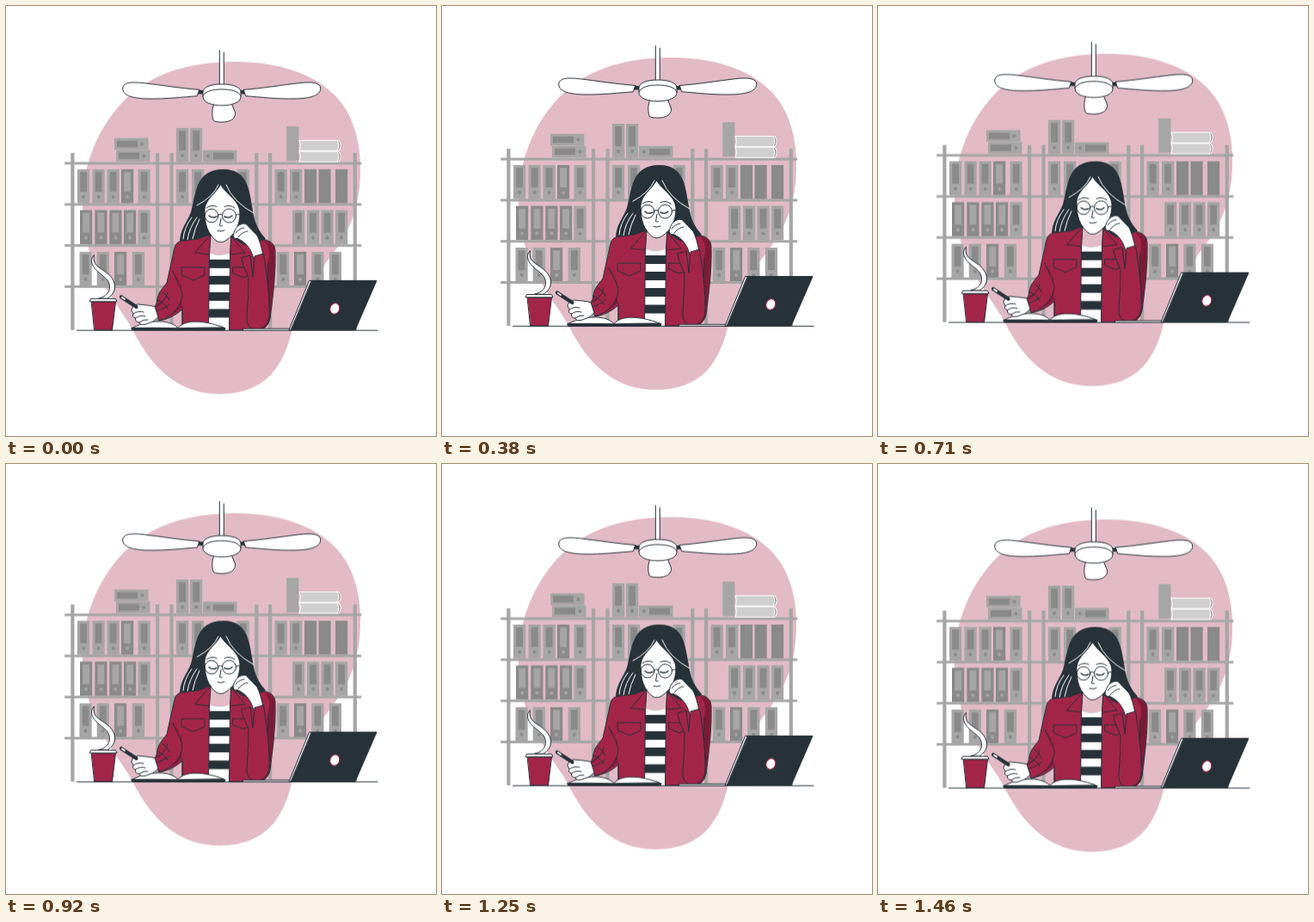
An HTML page for the animation above (1.5 s loop, 500 by 500 pixels).

```html
<!DOCTYPE html>
<html lang="en">
<head>
<meta charset="utf-8">
<title>Studying at the library</title>
<style>
  html, body { margin: 0; width: 100%; height: 100%; overflow: hidden; background: #fff; }
  svg { display: block; width: 100vw; height: 100vh; }
  #scene { animation: float 1.5s linear infinite; }
  @keyframes float { 50% { transform: translateY(-10px); } }
  .pink { fill: #e2bbc7; }
  .gray { fill: #a6a6a6; }
  .dim { fill: #8a8a8a; }
  .dark { fill: #263238; }
  .red { fill: #a32449; }
  .wine { fill: #7b1a37; }
  .white { fill: #fff; }
  .line { stroke: #263238; stroke-width: 1; stroke-linecap: round; stroke-linejoin: round; }
  .open { fill: none; }
  .strand { fill: none; stroke: #fff; stroke-width: 1; stroke-linecap: round; }
  .tome { fill: #cfcfcf; stroke: #fff; stroke-width: 1.1; }
</style>
</head>
<body>
<svg viewBox="0 0 500 500">
  <g id="scene">
    <path class="pink" d="M262 65C328 64 374 86 395 120C408 142 413 168 412 196C411 238 397 267 378 291C356 320 342 340 333 375C323 420 302 451 248 451.500C202 451 172 423 151 384C139 360 128 349 115 326C99 301 91 270 89 235C88 183 110 130 152 97C185 73 222 66 262 65Z"/>

    <g id="shelves"></g>
    <g class="tome">
      <path id="tome" d="M341 156.500H386.500Q389 158 389 162.300T386.500 168.500H341Q343.500 162.500 341 156.500Z"/>
      <use href="#tome" y="12.800"/>
      <path fill="none" d="M385.500 157Q388 162 385.500 168M385.500 170Q388 175 385.500 181"/>
      <path fill="none" stroke="#777" stroke-width=".8" d="M386.500 157.500Q389.800 162 386.500 167.500M386.500 170.500Q389.800 175 386.500 180.500"/>
    </g>

    <g id="fan" class="white line">
      <path d="M248.300 51.500V94H253.300V54"/>
      <path d="M222 98L231 99V102L222 102ZM280 98L271 99V102L280 102Z" class="dark"/>
      <path d="M224.500 97.500C204 96 180 92 160 89.700C145 88 136 89 135.700 96C136 105 149 107.500 164 108C187 108.500 205 106 222 104.800Z"/>
      <path d="M276.500 97.500C297 96 321 92 341 89.700C356 88 365.500 89 365.800 96C365.500 105 352 107.500 337 108C314 108.500 296 106 279 104.800Z"/>
      <path d="M242 114C239 121 239.500 127 241 133Q243 135.500 254 135C264 134 267 129 266.500 124L262 113Z"/>
      <path d="M229 100C229 94.500 238 91 251 91S273 94.500 273 100V106C273 112 263 115.800 251 115.800S229 112 229 106Z"/>
      <path class="open" d="M229 105C231 99 241 97 251 97S271 99 273 105"/>
    </g>

    <path class="dark" d="M202 275C202 260 211 251 215 240C221 218 220 190 253 190C282 190 283 216 287 238C289 253 294 262 302 271L292 281L208 279Z"/>
    <path class="strand" d="M206 271Q207 258 216 246M211 272Q213 258 222 246M217 271Q219 260 225 248"/>

    <path class="pink line" d="M238 262L236 290H261L262 262Z"/>
    <path class="white" d="M236 288Q248 291 260.500 288L260 377H235.500Z"/>
    <path class="dark" d="M236 295H260V305H236ZM236 314H260V324H236ZM236 333H260V343H236ZM236 352.500H260V362.500H236Z"/>

    <path class="white line" d="M249.500 208C243 219 233 224 231 236C230.500 254 235 266 245 273.500Q250 276.500 256 272.500C266 266 272 256 272 240C271 226 257 220 249.500 208Z"/>
    <path class="strand" d="M247 208Q241 222 222 232M256 208Q264 228 288 241"/>
    <g class="line open">
      <circle cx="239" cy="244" r="7.800"/>
      <circle cx="259.500" cy="244" r="8"/>
      <path d="M246.800 243Q249 241 251.500 243M267.500 243L272 242M233 235Q239 230.500 245 233.500M254 233.500Q260 230.500 266 235"/>
      <path stroke-width="1.500" d="M236 244Q240 247.500 245 245M254 245Q259 247.500 263 244"/>
      <path d="M250 247L248.500 255.500Q250 257 251.500 255.500M246 261.500Q250 263 254 261"/>
    </g>

    <g class="line">
      <path class="red" d="M223 271L203 273.500Q196 275 194.500 288L187 322C181 330 176 334 175.500 345L173 350L178 366C186 365 196 361 205 353L205 377H235.500L236.500 289L238 266Z"/>
      <path class="red" d="M262 268L277 278L286 275L301 272Q312 274 313 284C314 312 310 340 307 364Q304 377 290 377H259.500L260.500 289Z"/>
    </g>
    <path class="wine" d="M300 273Q312 275 312.500 285C313 313 309 343 306.500 364Q304 375 298 376Q306 360 305 333Q303 309 306 290Q307 280 300 273ZM194 310Q201 316 203 325C198 335 185 341 176 347Q177 357 181 363Q196 360 204 350V325Z"/>
    <path class="red line" d="M194 309C199 321 205 329 205 337C203 350 194 361 178 366L172.500 351Q186 344 188 333"/>
    <g class="line open">
      <path d="M238 266L219.500 287L236.500 289M262 268L278 287L261 289M205 350V377"/>
      <path d="M204.500 304H231V313L218 319L204.500 313ZM264 304H281L283 313L276 316L264 311Z"/>
      <path d="M182 333Q188 337 190 342M176 342Q184 345 188 352M174 355Q183 353 190 347M305 298Q303 330 307 351"/>
    </g>

    <path class="white line" d="M264 268C265 258 272 252 279 253.500L292 267Q296 275 299 290L288 294C285 282 278 274 269 270.500Q266 272 264 268Z"/>
    <path class="line open" d="M267 264Q272 258 277 258M270 269Q276 262 281 262"/>
    <path class="red line" d="M274 293L284 290L287 315L289 291L299.500 288C303 310 307 341 306 362Q303 377 289 376Q279 374 280 361Q282 337 282 316L276 302Z"/>

    <g class="line">
      <path class="dark" d="M146 374.500L170 373L200 375L230 373L255 374.500L254 377.200H147Z"/>
      <path class="white" d="M147 374.500C160 367 188 362 200 374.500C210 362 238 368 253 374Q225 374 200 374.800Q175 374 147 374.500Z"/>
      <path class="white" d="M146 354Q146 349 153 347L164 348L173 349.500L177 362Q172 368 163 370Q156 372 155 368Q150 368 150.500 363Q146 362 148 358Z"/>
      <path class="open" d="M148 358Q154 354 160 356M150.500 363Q156 359 162 361M155 368Q160 364 165 365"/>
      <path stroke-width="4.200" d="M134 338.500L151.500 350"/>
      <path stroke="#fff" stroke-width="2" d="M135 339L138 341"/>
    </g>

    <path class="white line" stroke-width=".8" d="M108 340C121 337 123 327 118 319C110 310 97 305 100 293L102.500 289.500C100 302 109 304 118 311C130 321 129 334 118 340Z"/>
    <path class="red line" d="M99.500 344H127.500L123.500 377H103Z"/>
    <path class="white line" d="M99 340.500H127.500L129 343.800H97.500Z"/>

    <path class="line" d="M82.500 377.300H432"/>
    <path class="white line" d="M276 375.300H330L332 377.300H276Z"/>
    <path class="white line" d="M353 319.500H358L334 377H329.500Z"/>
    <path class="dark line" d="M355.500 319.500H431L406 377H331.500Z"/>
    <ellipse class="white" stroke="#a32449" cx="382.300" cy="352" rx="5.400" ry="6.400" transform="rotate(20 382.300 352)"/>
  </g>
</svg>
<script>
  const shelves = document.getElementById('shelves');
  const add = (tag, cls, attrs) => {
    const el = document.createElementNS('http://www.w3.org/2000/svg', tag);
    el.setAttribute('class', cls);
    for (const k in attrs) el.setAttribute(k, attrs[k]);
    shelves.appendChild(el);
  };
  const rect = (cls, x, y, width, height) => add('rect', cls, { x, y, width, height });
  const dot = (cls, cx, cy) => add('circle', cls, { cx, cy, r: 2 });

  const upright = (x, y, body = 'gray', label = 'dim') => {
    rect(body, x, y, 14.2, 39.5);
    rect(label, x + 3.2, y + 3.2, 7.8, 23);
    dot(label, x + 7.1, y + 32);
  };
  const lying = (x, y, flip) => {
    rect('gray', x, y, 39.5, 13.6);
    rect('dim', x + (flip ? 12 : 3), y + 3, 24, 7.6);
    dot('dim', x + (flip ? 6 : 32.5), y + 6.8);
  };
  const row = (y, xs, ...style) => xs.forEach(x => upright(x, y, ...style));
  const inverse = ['dim', 'gray'], solid = ['dim', 'dim'];

  row(142, [198, 214]);
  row(190, [83, 100.5, 117.5, 153.5, 198, 216, 268.5, 312.5, 330]);
  row(190, [134], ...inverse);
  row(190, [347, 363.5, 383], ...solid);
  row(237.5, [86, 103.3, 120.3, 137], ...inverse);
  row(237.5, [153.5, 333, 350, 366.5, 383]);
  row(286, [85.5, 105.7, 146.8, 315, 355.3, 375.8]);
  row(286, [126, 335], ...inverse);
  lying(126, 153.7);
  lying(128, 167.6);
  lying(229, 167.8, true);
  rect('gray', 326.3, 140.2, 14.2, 40);

  [75.3, 174, 190.4, 289.2, 305, 403.7].forEach(x => rect('gray', x, 171, 4.2, 206));
  [181.6, 229.4, 277.2, 325].forEach(y => rect('gray', 68.2, y, 345, 3));
</script>
</body>
</html>
```
